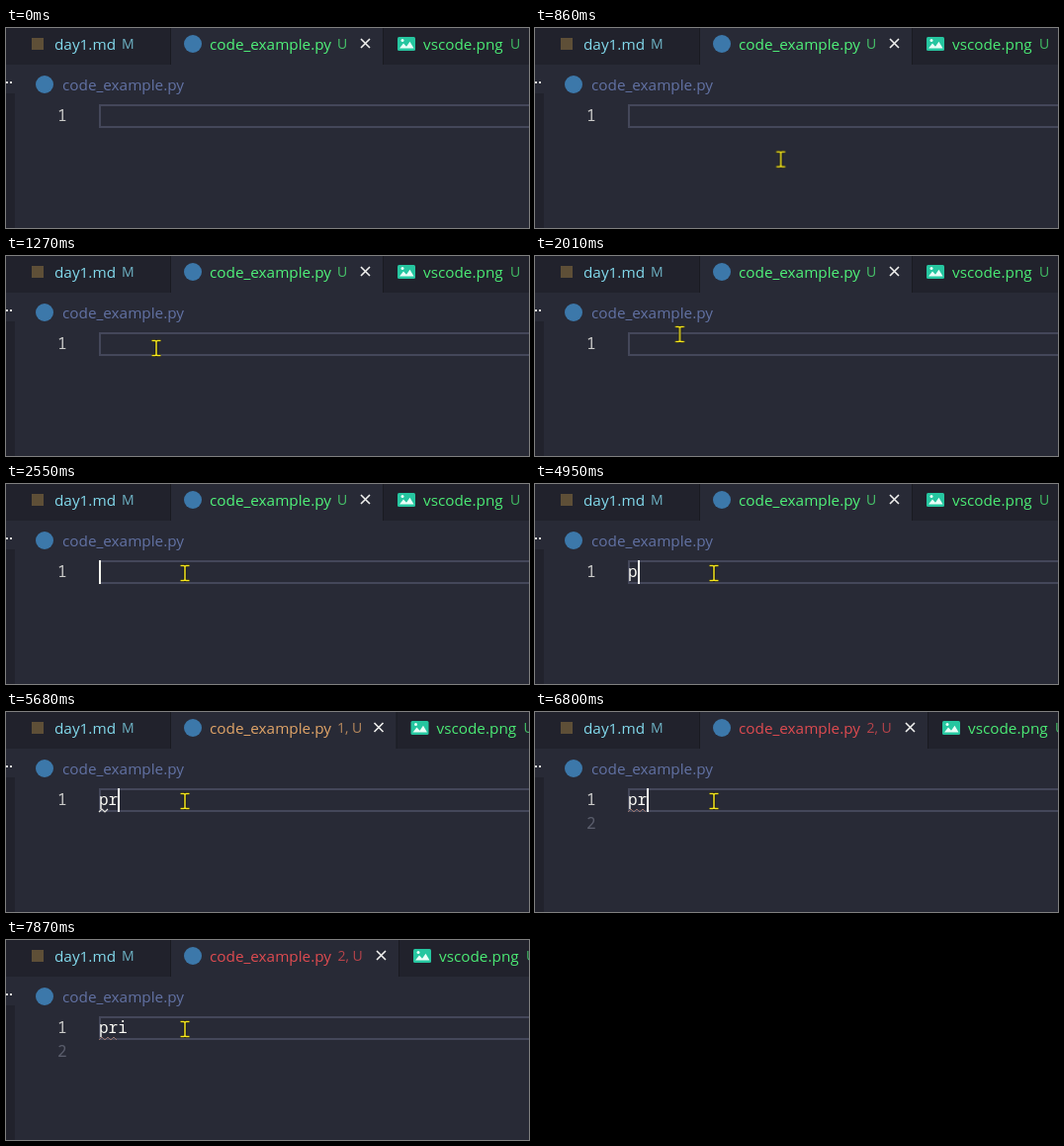
An HTML page for the animation above (8000 ms loop, 529 by 202 pixels).

```html
<!DOCTYPE html>
<html lang="en">
<head>
<meta charset="utf-8">
<title>Editor typing</title>
<style>
  html, body { margin: 0; width: 100%; height: 100%; overflow: hidden; background: #282a36; }
  svg { display: block; width: 529px; height: 202px; }
  text { font: 15.3px "Open Sans", "Noto Sans", sans-serif; white-space: pre; }
  .badge { font-size: 14px; opacity: .78; }
  .mono { font: 500 16px "Noto Sans Mono", "DejaVu Sans Mono", monospace; }

  .caret, .typed, .status, .shift, .boundary, .ok, .warn, .error, .click {
    animation: 8s step-end infinite;
  }
  .caret { animation-name: caret; }
  .typed { animation-name: typed; }
  .status { animation-name: status; }
  .shift { animation-name: shift; }
  .boundary { animation-name: boundary; }
  .ok { animation-name: ok; }
  .warn { animation-name: warn; }
  .error { animation-name: error; }
  .click { animation-name: click; }
  .pointer { animation: pointer 8s step-end infinite; }

  @keyframes pointer {
    0% { transform: translate(-30px, -30px); }
    7.375% { transform: translate(303.5px, 157.5px); animation-timing-function: steps(5); }
    11.625% { transform: translate(212px, 116px); animation-timing-function: steps(5); }
    15.875% { transform: translate(152px, 93px); }
    16.75% { transform: translate(146.5px, 83.5px); }
    17.625% { transform: translate(146.5px, 79px); }
    28.5% { transform: translate(146.5px, 79px); animation-timing-function: steps(4, start); }
    33%, 100% { transform: translate(181px, 90px); }
  }
  @keyframes click {
    0%, 21.875%, 100% { opacity: 0; }
    17.625% { opacity: 1; }
  }
  @keyframes caret {
    0%, 25.125%, 37.75%, 50.25% { opacity: 0; transform: none; }
    18.5%, 31.875%, 43.625%, 56.875% { opacity: 1; transform: none; }
    61.875% { opacity: 1; transform: translateX(10px); }
    67.75% { opacity: 0; transform: translateX(10px); }
    71%, 83.375% { opacity: 1; transform: translateX(19px); }
    76.75%, 89.25% { opacity: 0; transform: translateX(19px); }
    91.75% { opacity: 1; transform: translateX(29px); }
    98.375%, 100% { opacity: 0; transform: translateX(29px); }
  }
  @keyframes typed {
    0% { width: 0; }
    61.875% { width: 9.6px; }
    71% { width: 19.2px; }
    91.75%, 100% { width: 29px; }
  }
  @keyframes status {
    0% { fill: #50f27a; }
    63.5% { fill: #e0a468; }
    85%, 100% { fill: #de4b50; }
  }
  @keyframes shift {
    0% { transform: none; }
    63.5% { transform: translateX(13.5px); }
    85%, 100% { transform: translateX(16px); }
  }
  @keyframes boundary {
    0% { width: 214px; }
    63.5% { width: 228px; }
    85%, 100% { width: 230px; }
  }
  @keyframes ok { 0% { opacity: 1; } 63.5%, 100% { opacity: 0; } }
  @keyframes warn { 0% { opacity: 0; } 63.5% { opacity: 1; } 85%, 100% { opacity: 0; } }
  @keyframes error { 0% { opacity: 0; } 85%, 100% { opacity: 1; } }
</style>
</head>
<body>
<svg viewBox="0 0 529 202">
  <defs>
    <clipPath id="typed"><rect class="typed" x="94" y="77" width="0" height="26"/></clipPath>
  </defs>

  <!-- tab bar -->
  <rect width="529" height="37" fill="#21222c"/>
  <rect x="166" width="1" height="37" fill="#191a21"/>
  <rect class="boundary" x="167" width="214" height="37" fill="#282a36"/>

  <rect x="26" y="10" width="12" height="12" fill="#5e4f37"/>
  <g fill="#82d9ec">
    <text x="49" y="22">day1.md</text>
    <text class="badge" x="117" y="21">M</text>
  </g>

  <circle cx="189" cy="16" r="9" fill="#3c78aa"/>
  <g class="status">
    <text x="206" y="22">code_example.py</text>
    <g class="ok"><text class="badge" x="335" y="21">U</text></g>
    <g class="warn"><text class="badge" x="335" y="21">1, U</text></g>
    <g class="error"><text class="badge" x="335.5" y="21">2, U</text></g>
  </g>

  <g class="shift">
    <path d="M359 11l9 9m0-9l-9 9" stroke="#f0f0ee" stroke-width="1.6"/>
    <rect x="381" width="1" height="37" fill="#191a21"/>
    <rect x="396" y="9" width="18" height="14" rx="1.5" fill="#26c6a0"/>
    <path d="M398 20.5l4-5 3 3.2 3.5-5 4 6.8z" fill="#e9fff8"/>
    <circle cx="401" cy="12.5" r="1.5" fill="#e9fff8"/>
    <g fill="#4beb75">
      <text x="422" y="22">vscode.png</text>
      <text class="badge" x="510" y="21">U</text>
    </g>
  </g>

  <!-- sidebar edge and breadcrumb -->
  <rect y="66" width="9" height="136" fill="#21222c"/>
  <path d="M0 54h2v2h-2zM4 54h2v2h-2z" fill="#e0e0dc"/>
  <circle cx="39" cy="57" r="9" fill="#3c78aa"/>
  <text x="57" y="63" fill="#6272a4">code_example.py</text>

  <!-- editor -->
  <path d="M540 78H95V100H540" fill="none" stroke="#44475a" stroke-width="2"/>
  <text class="mono" x="52" y="94" fill="#cacac8">1</text>
  <g class="error"><text class="mono" x="52" y="118" fill="#5a5d6c">2</text></g>
  <g fill="none">
    <path class="warn" d="M94 101l3-3 3 3 3-3" stroke="#e2e2dc" stroke-width="1.2"/>
    <path class="error" d="M94 101l3-3 3 3 3-3 3 3 3-3 3 3" stroke="#93716b"/>
  </g>
  <g clip-path="url(#typed)"><text class="mono" x="94" y="94" fill="#f8f8f2">pri</text></g>
  <rect class="caret" x="94" y="77" width="2" height="24" fill="#f8f8f0"/>

  <!-- mouse pointer -->
  <g class="pointer">
    <circle class="click" r="15" fill="#ff0" fill-opacity=".47"/>
    <g fill="none">
      <path d="M-4.5-7.5H4.5M0-7.5V7.5M-4.5 7.5H4.5" stroke="#15151a" stroke-width="3"/>
      <path d="M-4.5-7.5H-1L0-6.5 1-7.5H4.5M0-6.5V6.5M-4.5 7.5H-1L0 6.5 1 7.5H4.5" stroke="#f5e61c" stroke-width="1.5"/>
    </g>
  </g>
</svg>
</body>
</html>
```
